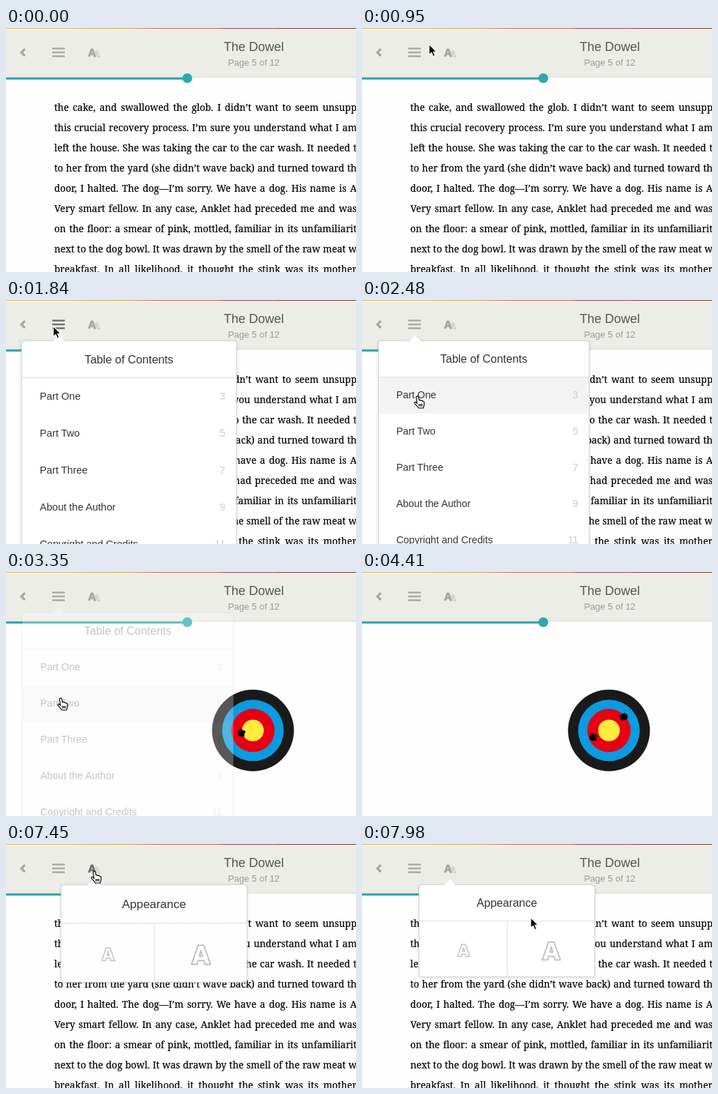
These frames come from a looping animation (500 px wide and 350 px high, 8 s). An HTML page:

```html
<!DOCTYPE html>
<html lang="en">
<head>
<meta charset="utf-8">
<title>E-book reader</title>
<style>
  html, body { margin: 0; width: 100%; height: 100%; overflow: hidden; }
  body { background: #fefefe; font-family: "Liberation Sans", Arial, sans-serif; }
  #stage { position: relative; width: 500px; height: 350px; overflow: hidden; }
  #stage > * { position: absolute; }
  svg { left: 0; top: 0; overflow: visible; }

  #page {
    left: 69px; top: 99px; color: #000; -webkit-text-stroke: .2px #000;
    font: 13.6px/29px "Noto Serif", "Liberation Serif", serif;
  }
  #page span { position: absolute; left: 0; white-space: nowrap; }

  header { left: 0; top: 0; width: 500px; height: 70px; background: #edede7; border-bottom: 1px solid #d6d6d3; }
  header::before {
    content: ""; position: absolute; width: 100%; height: 1px;
    background: linear-gradient(90deg, #fbb917 0 18%, #f5921e 37%, #e8591f 43% 60%, #d8281c 62% 77%, #a81c1c 78%);
  }
  header div { position: absolute; left: 208px; width: 292px; text-align: center; white-space: nowrap; }
  .book { top: 16px; font-size: 18px; line-height: 22px; color: #555; }
  .count { top: 41px; font-size: 13px; line-height: 17px; color: #999; }

  .pop {
    top: 58px; box-sizing: border-box; background: #fff; border: 1px solid #d4d4d4;
    border-radius: 4px; box-shadow: 0 1px 4px rgba(0,0,0,.14); transform-origin: 20% 0; color: #333;
  }
  .pop::before {
    content: ""; position: absolute; left: var(--tip); top: -6px; width: 11px; height: 11px;
    background: #fff; transform: rotate(45deg);
  }
  .pop h2 {
    position: relative; margin: 0; height: 51px; border-bottom: 1px solid #e0e0e0;
    font-size: 16px; line-height: 51px; font-weight: 400; text-align: center;
  }
  #toc { left: 23px; width: 302px; height: 314px; --tip: 46px; }
  #toc::after { content: ""; position: absolute; left: 0; right: 0; bottom: 0; height: 11px; background: rgba(0,0,0,.04); }
  .row { display: flex; justify-content: space-between; padding: 0 15px 0 25px; font-size: 14.25px; line-height: 51px; height: 52px; }
  .row b { font-weight: 400; color: #ccc; }
  .row.hot { background: #f3f3f3; }
  #look { left: 81px; width: 252px; height: 133px; --tip: 38px; }
  #look svg { position: absolute; }
  .line { fill: #fff; stroke: #c2c2c2; stroke-linejoin: round; }
</style>
</head>
<body>
<div id="stage">
  <div id="page"></div>

  <svg id="loader" width="500" height="350">
    <g id="rings"></g>
    <path class="hole" d="M-6-1L-2-6 2-4 6-3 4 2 4 5-1 5-4 4Z"/>
    <path class="hole" d="M-6-2L-2-4 1-6 4-4 6-1 4 4-2 5-5 3Z"/>
  </svg>

  <header>
    <div class="book">The Dowel</div>
    <div class="count">Page 5 of 12</div>
  </header>

  <svg width="500" height="90">
    <defs>
      <path id="A" fill-rule="evenodd" d="M7 0H13L20 20H14L13 16H7L6 20H0ZM10 5.5L8.4 11.5H11.6Z"/>
    </defs>
    <path d="M27 30L22 35L27 40" fill="none" stroke="#a6a6a4" stroke-width="3.2"/>
    <path id="menu" d="M66 29.5H84M66 35H84M66 40.5H84" stroke-width="2.4"/>
    <use href="#A" transform="translate(125.5 33) scale(.42)" fill="#f2f2ee" stroke="#b4b4b2" stroke-width="2"/>
    <use id="size" href="#A" transform="translate(117 29.5) scale(.58)"/>
    <path d="M0 72.5H259" stroke="#2fa8b0" stroke-width="3"/>
    <circle cx="259" cy="72" r="7" fill="#2fa8b0"/>
  </svg>

  <section id="toc" class="pop"><h2>Table of Contents</h2></section>

  <section id="look" class="pop">
    <h2>Appearance</h2>
    <svg width="250" height="131">
      <path d="M125.5 52V131" stroke="#e0e0e0"/>
      <g class="line">
        <use href="#A" transform="translate(54.5 85) scale(.87)" stroke-width="1.7"/>
        <use href="#A" transform="translate(175.5 81.5) scale(1.29)" stroke-width="1.5"/>
      </g>
    </svg>
  </section>

  <svg id="cursor" width="500" height="350">
    <path id="arrow" d="M-.5-.5V14.5L3 11.4L5.4 17L8 15.9L5.7 10.4H10.3Z" fill="#000" stroke="#fff" stroke-width="1.2"/>
    <g id="hand" stroke="#000" stroke-width="1.2" stroke-linejoin="round">
      <path fill="#fff" d="M-1.6 1.5C-1.6-.6 1.5-.6 1.8 1.5L2.6 6C4 5 5 5.5 5.2 6.5C6.5 5.8 7.6 6.4 7.8 7.4C9 7 9.8 7.8 9.8 9V12C9.8 14 8.6 15 8.6 17H1.6C1 15-2 12.5-3.6 10.5C-4.8 9-3.4 7.8-2 8.8L-.2 10.3Z"/>
      <path d="M2.6 11V14.5M4.6 11V14.5M6.6 11V14.5"/>
    </g>
  </svg>
</div>

<script>
const $ = id => document.getElementById(id);
const LOOP = 8000;

const lines = [
  "the cake, and swallowed the glob. I didn’t want to seem unsupp",
  "this crucial recovery process. I’m sure you understand what I am",
  "left the house. She was taking the car to the car wash. It needed t",
  "to her from the yard (she didn’t wave back) and turned toward th",
  "door, I halted. The dog—I’m sorry. We have a dog. His name is A",
  "Very smart fellow. In any case, Anklet had preceded me and was",
  "on the floor: a smear of pink, mottled, familiar in its unfamiliarit",
  "next to the dog bowl. It was drawn by the smell of the raw meat w",
  "breakfast. In all likelihood, it thought the stink was its mother"
];
const COLUMN = 432;

// Justified column: spread what is left over between the words.
lines.forEach((text, i) => {
  const span = document.createElement("span");
  span.textContent = text;
  span.style.top = i * 29 + "px";
  $("page").append(span);
  const gaps = text.split(" ").length - 1;
  span.style.wordSpacing = (COLUMN - span.getBoundingClientRect().width) / gaps + "px";
});

const rows = ["Part One", "Part Two", "Part Three", "About the Author", "Copyright and Credits"].map((name, i) => {
  const row = document.createElement("div");
  row.className = "row";
  row.innerHTML = `<span>${name}</span><b>${3 + 2 * i}</b>`;
  $("toc").append(row);
  return row;
});

$("rings").innerHTML = [[58.5, "#1a1a1a"], [44, "#0a9be0"], [31, "#e60012"], [15.5, "#ffeb3b"]]
  .map(([r, c]) => `<circle cx="352.8" cy="227.3" r="${r}" fill="${c}"/>`).join("");

const holes = [...document.querySelectorAll(".hole")];
const shots = [[330.5, 237, 3170, 3470], [374, 208, 4180, 4410]];

// Bursts of movement: start, end, number of steps.
const bursts = [
  [480, 1180, 13], [1540, 2300, 14], [2360, 3050, 13], [3170, 3470, 5], [4180, 4410, 5],
  [5310, 5310, 1], [5910, 6670, 14], [6730, 6730, 1], [7330, 7980, 12]
];

const walk = [
  [480, 477, 73], [600, 340, 52], [760, 200, 34], [920, 105, 23], [1040, 66, 27], [1180, 68, 38],
  [1900, 68, 38], [2100, 69, 72], [2300, 71, 112], [2475, 79, 138], [2800, 79, 165], [3050, 78, 181]
];
const leave = [[7560, 126, 39], [7760, 165, 58], [7980, 241.5, 106]];

// Time since opening, scale, opacity.
const bounce = [
  [0, .55, .3], [60, .82, .8], [120, 1.066, 1], [180, 1.083, 1], [240, 1.05, 1], [300, 1.015, 1], [360, 1, 1]
];

function snap(t) {
  const burst = bursts.filter(b => b[0] <= t).pop();
  if (!burst) return 0;
  const [start, end, n] = burst;
  const step = (end - start) / (n - 1) || 1;
  return start + Math.min(n - 1, Math.floor((t - start) / step)) * step;
}

function at(keys, t) {
  const i = keys.findIndex(k => k[0] > t);
  if (i < 0) return keys[keys.length - 1].slice(1);
  if (i === 0) return keys[0].slice(1);
  const a = keys[i - 1], b = keys[i], p = (t - a[0]) / (b[0] - a[0]);
  return a.slice(1).map((v, j) => v + (b[j + 1] - v) * p);
}

const clamp = v => Math.max(0, Math.min(1, v));
const within = (t, a, b) => t >= a && t < b;
const show = (el, on) => { el.style.visibility = on ? "visible" : "hidden"; };

function pointer(t) {
  if (t < 5000) return at(walk, t);
  if (t >= 7330) return at(leave, t);
  const rest = 1 - clamp((t - 5910) / 760);
  return [126 + 331 * rest ** 1.95, 39 + 164 * rest ** 2.2];
}

function popup(el, t, open, fade) {
  show(el, t >= open && fade > 0);
  const [scale, alpha] = at(bounce, t - open);
  el.style.transform = `scale(${scale})`;
  el.style.opacity = alpha * fade;
}

function draw(time) {
  const t = snap(time);
  const loading = within(t, 3170, 5310);
  show($("page"), !loading);
  show($("loader"), loading);

  shots.forEach(([x, y, start, end], i) => {
    const away = 12 * (1 - clamp((t - start) / (end - start)));
    show(holes[i], loading && t > start);
    holes[i].setAttribute("transform", `translate(${x + away} ${y - away})`);
  });

  popup($("toc"), t, 1540, clamp((3400 - t) / 290));
  popup($("look"), t, 7330, 1);

  const [x, y] = pointer(t);
  const overRows = within(t, 2250, 4180) && y > 110;
  rows.forEach((row, i) => row.classList.toggle("hot", overRows && Math.floor((y - 110) / 52) === i));
  const menuHot = within(t, 1000, 1990), sizeHot = within(t, 6610, 7630);
  $("menu").setAttribute("stroke", menuHot ? "#707070" : "#a9a9a7");
  $("size").setAttribute("fill", sizeHot ? "#707070" : "#a6a6a4");

  const visible = within(t, 480, 4180) || t >= 5910;
  const hand = overRows || within(t, 6730, 7630);
  show($("arrow"), visible && !hand);
  show($("hand"), visible && hand);
  for (const id of ["arrow", "hand"]) $(id).setAttribute("transform", `translate(${x} ${y})`);
}

const begin = performance.now();
function tick() {
  draw((performance.now() - begin) % LOOP);
  requestAnimationFrame(tick);
}
tick();
</script>
</body>
</html>
```
